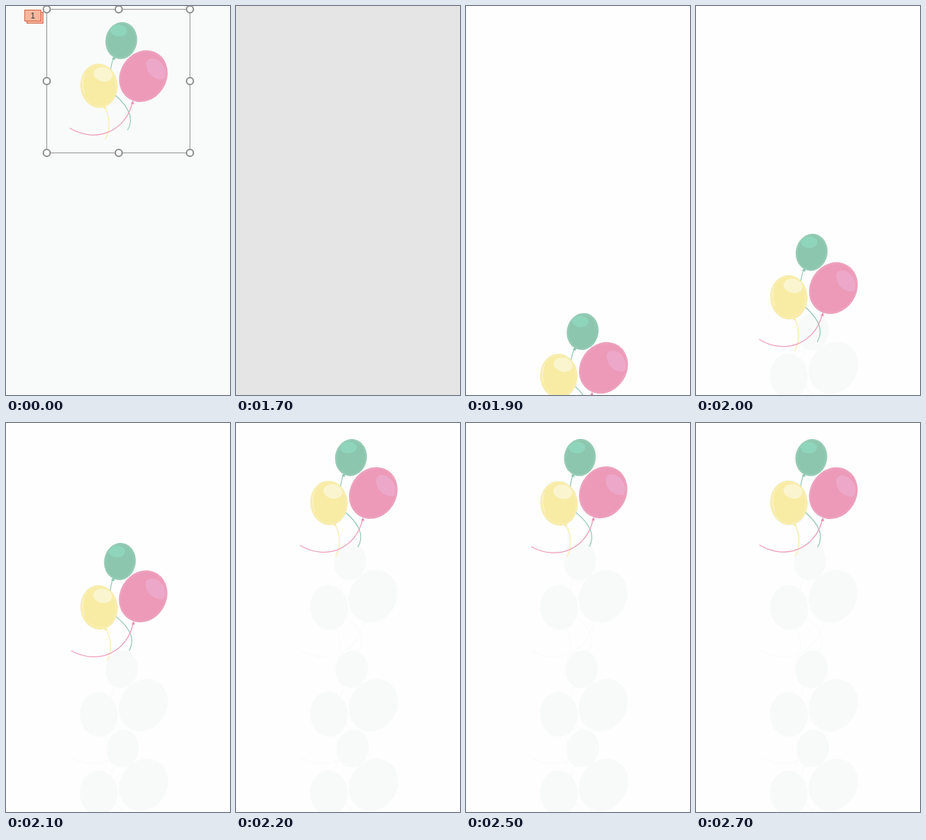
An HTML page for the animation above (3.4 s loop, 305 px wide and 531 px high).

```html
<!DOCTYPE html>
<html lang="en">
<head>
<meta charset="utf-8">
<title>Balloons</title>
<style>
  html, body { margin: 0; width: 100%; height: 100%; overflow: hidden; }
  svg { display: block; width: 100vw; height: 100vh; }
  .trail { fill: #f8faf9; stroke: #f8faf9; }
  .trail .body { stroke-width: 1.8; }
  .trail .string { stroke-width: 3.6; }
  .string { fill: none; }
</style>
</head>
<body>
<svg viewBox="0 0 305 531">
  <defs>
    <ellipse id="green" class="body" rx="21.5" ry="25.3" transform="translate(157 47.2) rotate(10)"/>
    <ellipse id="yellow" class="body" rx="25.3" ry="30.2" transform="translate(126.5 108.9) rotate(-4)"/>
    <ellipse id="pink" class="body" rx="31.6" ry="36.6" transform="translate(187 95.8) rotate(32)"/>
    <path id="greenString" class="string" d="M147 70Q144 76 142.300 88M149 122C164 135 176 152 165.500 169.500"/>
    <path id="yellowString" class="string" d="M134.500 138C141 150 143 168 135 182"/>
    <path id="pinkString" class="string" d="M172.300 131C163 172 122 188 86.500 166.500"/>

    <g id="balloons">
      <g stroke="#8cc7b2" stroke-width="1.1">
        <use href="#greenString"/>
        <path d="M148 69l-3 3 3 1z" fill="#8cc7b2"/>
      </g>
      <use href="#green" fill="#8cc6ae"/>
      <ellipse rx="19.900" ry="23.700" transform="translate(157 47.200) rotate(10)" fill="none" stroke="#9bcfb9" stroke-width="1"/>
      <ellipse cx="153.500" cy="33.500" rx="11.200" ry="8" fill="#8fd5bb"/>
      <use href="#yellowString" stroke="#f9efb0" stroke-width="1.3"/>
      <path d="M134 136l-2 4h5z" fill="#f8eba5"/>
      <use href="#yellow" fill="#f8eba4"/>
      <ellipse rx="23.300" ry="28.200" transform="translate(126.500 108.900) rotate(-4)" fill="none" stroke="#f9f0b8" stroke-width="1"/>
      <path d="M107 93q-5 13 0 27" fill="none" stroke="#fbf4cb" stroke-width="1.2"/>
      <ellipse rx="13" ry="9.700" transform="translate(132 93.300) rotate(12)" fill="#fbf5cf"/>
      <use href="#pinkString" stroke="#f0a0bd" stroke-width="1.3"/>
      <path d="M173 129l-3 4.500 4.500 .5z" fill="#ea8fb2"/>
      <use href="#pink" fill="#ec9ab8"/>
      <ellipse rx="29.900" ry="34.900" transform="translate(187 95.800) rotate(32)" fill="none" stroke="#efa5c1" stroke-width="1"/>
      <path d="M191 77C194 69 205 71 211 77C217 84 219 92 215 100C206 102 190 95 191 77Z" fill="#eda8c9"/>
    </g>

    <g id="trail" class="trail">
      <use href="#green"/><use href="#yellow"/><use href="#pink"/>
      <use href="#greenString"/><use href="#yellowString"/><use href="#pinkString"/>
    </g>
  </defs>

  <rect id="stage" width="305" height="531"/>
  <g id="trails"></g>
  <use id="bunch" href="#balloons"/>
  <g id="editor">
    <rect x="55.500" y="4.500" width="195" height="196" fill="none" stroke="#969696"/>
    <g id="handles" fill="#fff" stroke="#929292" stroke-width="2"></g>
    <g fill="#f6b79d" stroke="#d4694a">
      <rect x="28.500" y="8.500" width="22" height="15"/>
      <rect x="25.500" y="5.500" width="22" height="15"/>
    </g>
    <text x="36.500" y="17" font-family="'Liberation Sans', Arial, sans-serif" font-size="11" text-anchor="middle" fill="#333">1</text>
  </g>
</svg>
<script>
const LOOP = 3400, STEP = 100;
const BLANK = 1700, CLEAR = 1800, ENTER = 1900, SETTLE = 2700;
const RISE = [397, 289, 142];
const byId = id => document.getElementById(id);
const [stage, trails, bunch, editor, handles] =
  ["stage", "trails", "bunch", "editor", "handles"].map(byId);

function add(parent, tag, attrs) {
  const node = document.createElementNS("http://www.w3.org/2000/svg", tag);
  for (const key in attrs) node.setAttribute(key, attrs[key]);
  return parent.appendChild(node);
}

function show(node, visible) {
  node.setAttribute("display", visible ? "inline" : "none");
}

// Rise from below while teetering about the picture's centre.
function pose(time) {
  if (time < ENTER || time >= SETTLE) return "translate(0 0)";
  const lift = RISE[(time - ENTER) / STEP] || 0;
  const tilt = 2 * Math.cos((time - 1915) / 400 * 2 * Math.PI);
  return `translate(0 ${lift}) rotate(${tilt.toFixed(3)} 153 102.5)`;
}

for (const x of [55.5, 153.5, 250.5])
  for (const y of [4.5, 102.5, 200.5])
    if (x !== 153.5 || y !== 102.5) add(handles, "circle", { cx: x, cy: y, r: 4.7 });

const stamps = [];
for (let time = ENTER; time <= SETTLE; time += STEP)
  stamps.push({ time, node: add(trails, "use", { href: "#trail", transform: pose(time) }) });

function draw(elapsed) {
  const time = Math.floor(elapsed % LOOP / STEP) * STEP;
  const editing = time < BLANK;
  stage.setAttribute("fill", editing ? "#f9fbfa" : time < CLEAR ? "#e5e5e5" : "#fefefe");
  show(editor, editing);
  show(bunch, editing || time >= ENTER);
  bunch.setAttribute("transform", pose(time));
  for (const stamp of stamps) show(stamp.node, time >= stamp.time);
}

const start = performance.now();
function tick() {
  draw(performance.now() - start);
  requestAnimationFrame(tick);
}
tick();
</script>
</body>
</html>
```
